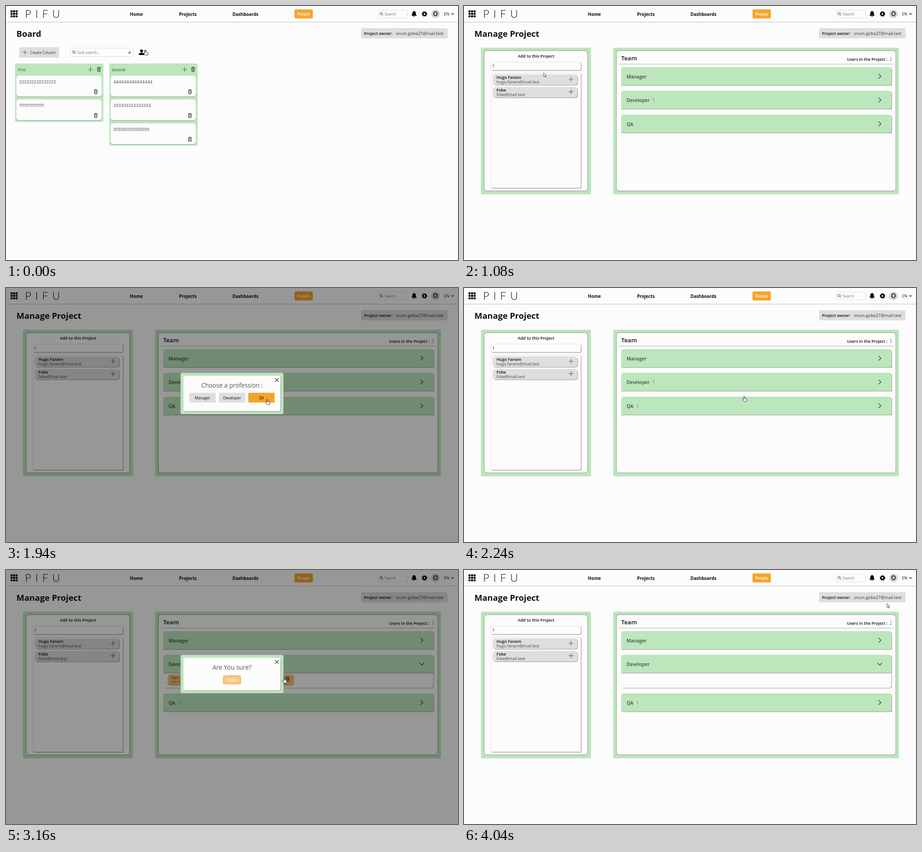
Animation of 998x561 px, one loop 4.06 s. Source, as an HTML page:

```html
<!DOCTYPE html>
<html lang="en">
<head>
<meta charset="utf-8">
<title>Project board</title>
<style>
html, body { margin: 0; width: 100%; height: 100%; overflow: hidden; background: #fcfcfc; }
svg { display: block; }
text { font-family: "Open Sans", "Noto Sans", sans-serif; fill: #111; }
.b { font-weight: 700; }
.s { font-weight: 600; }
.nav { font-size: 9.7px; }
.h1 { font-size: 18.5px; }
.t8 { font-size: 8.2px; }
.t9 { font-size: 9px; }
.c { text-anchor: middle; }
.dim { fill: #777; }
.task { font: 500 8.8px Inter, sans-serif; fill: #666; }
.bartext { font-size: 10.3px; font-weight: 600; fill: #444; }
.count { font-size: 10.5px; fill: #729072; }
.green { fill: #bce6bc; }
.gray { fill: #dedede; }
.orange { fill: #f5a42b; }
.white { fill: #fcfcfc; }
.line { fill: none; stroke: #222; stroke-width: 1.2; }
.soft { fill: none; stroke: #666; stroke-width: 1.2; }
.frame { fill: #fcfcfc; stroke: #a3a8a3; stroke-width: 1.3; }
.field { fill: #fcfcfc; stroke: #d6d6d6; stroke-width: .8; }
.sh { filter: drop-shadow(1px 1.2px .6px #999); }
.low { filter: drop-shadow(0 1.2px .5px #8a988a); }

/* Hard switches: one loop is 4060 ms */
.k { animation: 4060ms step-end infinite; }
.board { animation-name: board; }
.manage { animation-name: manage; }
.hint { animation-name: hint; }
.typed { animation-name: typed; }
.results { animation-name: results; }
.tip { animation-name: tip; }
.choose { animation-name: choose; }
.pick { animation-name: pick; }
.two { animation-name: two; }
.three { animation-name: three; }
.added { animation-name: added; }
.opened { animation-name: opened; }
.shift { animation-name: shift; }
.right { animation-name: right; }
.down { animation-name: down; }
.member { animation-name: member; }
.sure { animation-name: sure; }
.press { animation-name: press; }
.hand { animation-name: hand; }
.arrow { animation-name: arrow; }
@keyframes board { 0% { opacity: 1 } 4.4%, 100% { opacity: 0 } }
@keyframes manage { 0% { opacity: 0 } 4.4%, 100% { opacity: 1 } }
@keyframes hint { 0% { opacity: 1 } 22.1%, 100% { opacity: 0 } }
@keyframes typed { 0% { opacity: 0 } 22.1%, 100% { opacity: 1 } }
@keyframes results { 0% { opacity: 0 } 24.1%, 100% { opacity: 1 } }
@keyframes tip { 0% { opacity: 0 } 33% { opacity: 1 } 39.4%, 100% { opacity: 0 } }
@keyframes choose { 0% { opacity: 0 } 39.4% { opacity: 1 } 50.7%, 100% { opacity: 0 } }
@keyframes pick { 0% { opacity: 0 } 46.3% { opacity: 1 } 50.7%, 100% { opacity: 0 } }
@keyframes two { 0% { opacity: 1 } 51.7% { opacity: 0 } 91.1%, 100% { opacity: 1 } }
@keyframes three { 0% { opacity: 0 } 51.7% { opacity: 1 } 91.1%, 100% { opacity: 0 } }
@keyframes added { 0% { opacity: 0 } 51.7%, 100% { opacity: 1 } }
@keyframes opened { 0% { opacity: 0 } 67.45%, 100% { opacity: 1 } }
@keyframes shift { 0% { transform: none } 67.45%, 100% { transform: translateY(32.5px) } }
@keyframes right { 0% { opacity: 1 } 68.4%, 100% { opacity: 0 } }
@keyframes down { 0% { opacity: 0 } 68.4%, 100% { opacity: 1 } }
@keyframes member { 0% { opacity: 1 } 91.1%, 100% { opacity: 0 } }
@keyframes sure { 0% { opacity: 0 } 76.8% { opacity: 1 } 91.1%, 100% { opacity: 0 } }
@keyframes press { 0% { opacity: 0 } 82.2% { opacity: 1 } 86.4%, 100% { opacity: 0 } }
@keyframes hand {
  0% { opacity: 1 } 4.4% { opacity: 0 } 31.5% { opacity: 1 } 41.5% { opacity: 0 }
  45.5% { opacity: 1 } 79% { opacity: 0 } 82.2% { opacity: 1 } 86.4% { opacity: 0 }
  87.8% { opacity: 1 } 92.6%, 100% { opacity: 0 }
}
@keyframes arrow {
  0% { opacity: 0 } 4.4% { opacity: 1 } 31.5% { opacity: 0 } 41.5% { opacity: 1 }
  45.5% { opacity: 0 } 79% { opacity: 1 } 82.2% { opacity: 0 } 86.4% { opacity: 1 }
  87.8% { opacity: 0 } 92.6%, 100% { opacity: 1 }
}

.cursor { animation: move 4060ms ease-in-out infinite; }
@keyframes move {
  0%, 4.4% { transform: translate(308px, 97px) }
  10.8%, 12.3% { transform: translate(307px, 102px) }
  17.7%, 23.4% { transform: translate(150px, 131px) }
  32% { transform: translate(238px, 187px) }
  38.9%, 39.4% { transform: translate(247px, 190px) }
  45.8% { transform: translate(560px, 240px) }
  47.7%, 50.7% { transform: translate(577px, 246px) }
  64% { transform: translate(752px, 217px) }
  67.9%, 68.4% { transform: translate(750px, 218px) }
  73.9%, 76.8% { transform: translate(622px, 238px) }
  82.8%, 85.7% { transform: translate(500px, 241px); animation-timing-function: ease-in }
  88.67% { transform: translate(670px, 188px); animation-timing-function: ease-out }
  99.4%, 100% { transform: translate(934px, 74px) }
}
</style>
</head>
<body>
<svg width="998" height="561" viewBox="0 0 998 561">
  <defs>
    <g id="trash" fill="none" stroke="#222">
      <path d="M-4-3.4H4M-1.5-3.6V-4.8H1.5V-3.6M-3-3.2L-2.6 4.6H2.6L3-3.2"/>
      <path d="M-1.1-1.6V3M1.1-1.6V3" stroke-width=".8"/>
    </g>
    <path id="plus" class="soft" d="M-5.3 0H5.3M0-5.3V5.3"/>
    <path id="cross" class="line" d="M-4.2-4.2L4.2 4.2M4.2-4.2L-4.2 4.2"/>
    <g id="lens" fill="none" stroke="#333"><circle cx="-.7" cy="-.7" r="2.6"/><path d="M1.3 1.3L3.8 3.8"/></g>
    <path id="next" class="line" d="M-2.5-5L2.5 0L-2.5 5"/>
    <path id="bar" class="green sh" d="M347 40V6q0-6 6-6H938q6 0 6 6V40z"/>
    <rect id="card" class="white low" width="188" height="46" rx="6"/>
    <rect id="pill" class="gray sh" x="63.5" width="187" height="23.5" rx="6"/>
    <rect id="shade" width="998" height="561" fill-opacity=".4"/>
    <rect id="dot" width="4.4" height="4.4" rx="1"/>
    <g id="dots"><use href="#dot"/><use href="#dot" x="5.6"/><use href="#dot" x="11.2"/></g>
  </defs>

  <rect width="998" height="561" fill="#fcfcfc"/>

  <!-- Header -->
  <path d="M0 35.5H998" stroke="#b9bcc4"/>
  <use href="#dots" x="10" y="9.5"/><use href="#dots" x="10" y="15.1"/><use href="#dots" x="10" y="20.7"/>
  <text x="42" y="26" style="font:300 23.6px Lato,sans-serif;letter-spacing:9px">PIFU</text>
  <g class="b nav">
    <text x="273.5" y="21.7">Home</text>
    <text x="382" y="21.7">Projects</text>
    <text x="500" y="21.7">Dashboards</text>
  </g>
  <rect class="orange" x="637" y="7.5" width="40.5" height="20" rx="3"/>
  <text class="c s" x="657" y="20.8" style="font-size:8.6px;fill:#fff">People</text>
  <rect class="field" x="822" y="9" width="64.5" height="17" rx="2"/>
  <use href="#lens" x="829" y="17.5"/>
  <text class="t8 dim" x="836" y="20.7">Search</text>
  <path d="M895.5 20.5q1.7-1.2 1.7-4.7q0-3.4 3-4v-1h1.6v1q3 .6 3 4q0 3.5 1.7 4.7v.9h-11zM899.2 22.2h3.6q-.4 1.5-1.8 1.5t-1.8-1.5z"/>
  <g fill="none" stroke="#000">
    <circle cx="924" cy="17.5" r="3.3" stroke-width="2.7"/>
    <circle cx="924" cy="17.5" r="5" stroke-width="1.8" stroke-dasharray="2.4 1.527"/>
  </g>
  <circle cx="948.3" cy="17.5" r="9.2" fill="#cfcfcf"/>
  <text class="c s" x="948.3" y="22.2" font-size="13.5">O</text>
  <text x="967" y="20.5" font-size="9" style="fill:#1c2440">EN</text>
  <path class="line" d="M983 16L986 19L989 16"/>
  <rect class="gray" x="784" y="49" width="191" height="22.5" rx="3"/>
  <text class="s" x="790.5" y="64" font-size="9">Project owner:</text>
  <text x="861" y="64" font-size="9.4" style="fill:#333">orum.gobe27@mail.test</text>

  <!-- Board page -->
  <g class="k board">
    <text class="b h1" x="23" y="68">Board</text>
    <rect class="gray" x="29" y="91" width="88" height="23" rx="2"/>
    <use href="#plus" x="42" y="102.5"/>
    <text class="t8" x="53" y="105.7" style="fill:#333">Create Column</text>
    <rect class="field" x="142" y="93" width="139.5" height="18.5" rx="2"/>
    <use href="#lens" x="150.5" y="102.2"/>
    <text class="t8 dim" x="157" y="105.7">Task search...</text>
    <path class="soft" d="M270.5 100.5l5 5m0-5l-5 5"/>
    <circle cx="299.2" cy="99.2" r="3.1"/>
    <path d="M293 108.3q0-5 6.2-5t6.2 5z"/>
    <path d="M304 98.5h6M305 101.5h5M306 104.5h4" stroke="#222"/>

    <rect class="green" x="20" y="127" width="195" height="129" rx="3"/>
    <rect class="green" x="228" y="127" width="195" height="181.5" rx="3"/>
    <text class="s" x="26" y="143.5" font-size="8.4" style="fill:#5d665d">First</text>
    <text class="s" x="234" y="143.5" font-size="8.4" style="fill:#5d665d">Second</text>
    <use href="#plus" x="186.5" y="140"/><use href="#trash" x="205" y="140"/>
    <use href="#plus" x="394.5" y="140"/><use href="#trash" x="413" y="140"/>
    <use href="#card" x="23" y="154"/><use href="#card" x="23" y="206.6"/>
    <use href="#card" x="231" y="154"/><use href="#card" x="231" y="206.6"/><use href="#card" x="231" y="259.2"/>
    <g class="task">
      <text class="task" x="29" y="170.7">222222222222222</text>
      <text class="task" x="29" y="223.2">111111111111111</text>
      <text class="task" x="237" y="170.7">444444444444444</text>
      <text class="task" x="237" y="223.2">333333333333333</text>
      <text class="task" x="237" y="275.8">555555555555555</text>
    </g>
    <use href="#trash" x="198.2" y="189.5"/><use href="#trash" x="198.2" y="242"/>
    <use href="#trash" x="406.2" y="189.5"/><use href="#trash" x="406.2" y="242"/><use href="#trash" x="406.2" y="294.5"/>
  </g>

  <!-- Manage page -->
  <g class="k manage">
    <text class="b h1" x="23" y="68">Manage Project</text>
    <rect class="green" x="37.3" y="92" width="243" height="324" rx="3"/>
    <rect class="frame" x="44.5" y="98.5" width="228.5" height="310" rx="6"/>
    <text class="c s" x="159" y="114.4" font-size="9.1">Add to this Project</text>
    <rect class="field sh" x="60" y="123.8" width="198" height="18" rx="3"/>
    <text class="t8 dim k hint" x="63" y="136">Search User</text>
    <text class="t9 k typed" x="63.5" y="136" style="fill:#2b2b9a">f</text>
    <rect class="field sh" x="60" y="148.3" width="198" height="253.5" rx="2"/>

    <g class="k results">
      <use href="#pill" y="151"/><use href="#pill" y="178.7"/>
      <text class="s t9" x="71.7" y="161.4">Hugo Fanem</text>
      <text class="t9" x="71.7" y="171.3" style="fill:#444">hugo.fanem@mail.test</text>
      <text class="s t9" x="71.7" y="189">Fobe</text>
      <text class="t9" x="71.7" y="198.7" style="fill:#444">fobe@mail.test</text>
      <use href="#plus" x="236.3" y="162"/>
      <circle class="k tip" cx="236.3" cy="189.3" r="8.5" fill="#a2a2a2"/>
      <use href="#plus" x="236.3" y="189.3"/>
      <g class="k tip">
        <path d="M203.5 155.5H268.5q2 0 2 2V172.5q0 2-2 2H240.5L236.3 179L232 174.5H203.5q-2 0-2-2V157.5q0-2 2-2z" fill="#5f5f5f" fill-opacity=".88"/>
        <text class="c" x="236" y="168.2" font-size="8.8" style="fill:#eee">Add to Project</text>
      </g>
    </g>

    <rect class="green" x="329.3" y="92" width="631" height="324" rx="3"/>
    <rect class="frame" x="336.5" y="98.5" width="617" height="310" rx="6"/>
    <text class="s" x="347" y="119.5" font-size="13.4">Team</text>
    <text class="s t9" x="845.5" y="121">Users in the Project :</text>
    <text class="count k two" x="939.3" y="121.2">2</text>
    <text class="count k three" x="939.3" y="121.2">3</text>
    <path d="M341 128.3H949" stroke="#adadad"/>

    <use href="#bar" y="135"/>
    <text class="bartext" x="359" y="159.5">Manager</text>
    <use href="#next" x="918" y="155.2"/>

    <g class="k opened">
      <path class="white sh" d="M347 227H943.5V255q0 5.5-5.5 5.5H352.5q-5.5 0-5.5-5.5z"/>
      <g class="k member">
        <rect class="low" x="357" y="231" width="279" height="23" rx="6" fill="#f9c270"/>
        <text x="365" y="241" font-size="9.1" style="fill:#444">Tarv Bemol</text>
        <text class="t9" x="365" y="250.3" style="fill:#80715a">bemol_tarv@mail.test</text>
        <use href="#trash" x="621.5" y="241.3"/>
      </g>
    </g>
    <use href="#bar" y="187.3"/>
    <text class="bartext" x="359" y="212">Developer</text>
    <text class="count k member" x="416" y="212.2">1</text>
    <g class="k right"><use href="#next" x="918" y="207.7"/></g>
    <path class="line k down" d="M913 205.2L918 210.2L923 205.2"/>

    <g class="k shift">
      <use href="#bar" y="240"/>
      <text class="bartext" x="359" y="264.8">QA</text>
      <text class="count k added" x="380.3" y="265">1</text>
      <use href="#next" x="918" y="260.2"/>
    </g>
  </g>

  <!-- Profession dialog -->
  <g class="k choose">
    <use href="#shade"/>
    <rect class="green" x="385.5" y="187.5" width="227" height="91" rx="3"/>
    <rect class="white sh" x="392" y="194" width="214" height="78" rx="3"/>
    <use href="#cross" x="598" y="203"/>
    <text class="c" x="499" y="220" font-size="13.6" style="fill:#555">Choose a profession :</text>
    <path class="gray" d="M405 231.5h58v21.5h-58zm65 0h58v21.5h-58zm65 0h58v21.5h-58z"/>
    <rect class="orange k pick" x="535" y="231.5" width="58" height="21.5" rx="1"/>
    <g class="c t8">
      <text x="434" y="245.5">Manager</text>
      <text x="499" y="245.5">Developer</text>
      <text x="564" y="245.5">QA</text>
    </g>
  </g>

  <!-- Delete dialog -->
  <g class="k sure">
    <use href="#shade"/>
    <rect class="green" x="385.5" y="187.5" width="227" height="84.5" rx="3"/>
    <rect class="white sh" x="392" y="194" width="214" height="72" rx="3"/>
    <use href="#cross" x="598" y="203"/>
    <text class="c" x="499" y="220" font-size="13.7" style="fill:#555">Are You sure?</text>
    <rect x="479.5" y="233" width="39" height="19" rx="2" fill="#f9c57f" stroke="#efb263"/>
    <rect class="orange k press" x="479" y="232.5" width="40" height="20" rx="2"/>
    <text class="c s t8" x="499" y="245.7" style="fill:#fff6e8">Delete</text>
  </g>

  <g class="cursor">
    <path class="k hand" d="M-1.2 6.5V1a1 1 0 0 1 2 0v3.6q1.5-.6 1.9.4q1.3-.4 1.6.6q1.5-.2 1.5 1.2v2.1q0 2.8-3 2.8h-1.5q-1.6 0-2.6-1.6l-2.5-3.4q.6-1.6 2.6-.2z" fill="#fff" stroke="#111" stroke-width=".9"/>
    <path class="k arrow" d="M0 0V8.8L2 7L3.4 10L4.8 9.4L3.5 6.4H6.2z" fill="#fff" stroke="#222" stroke-width=".8"/>
  </g>
</svg>
</body>
</html>
```
